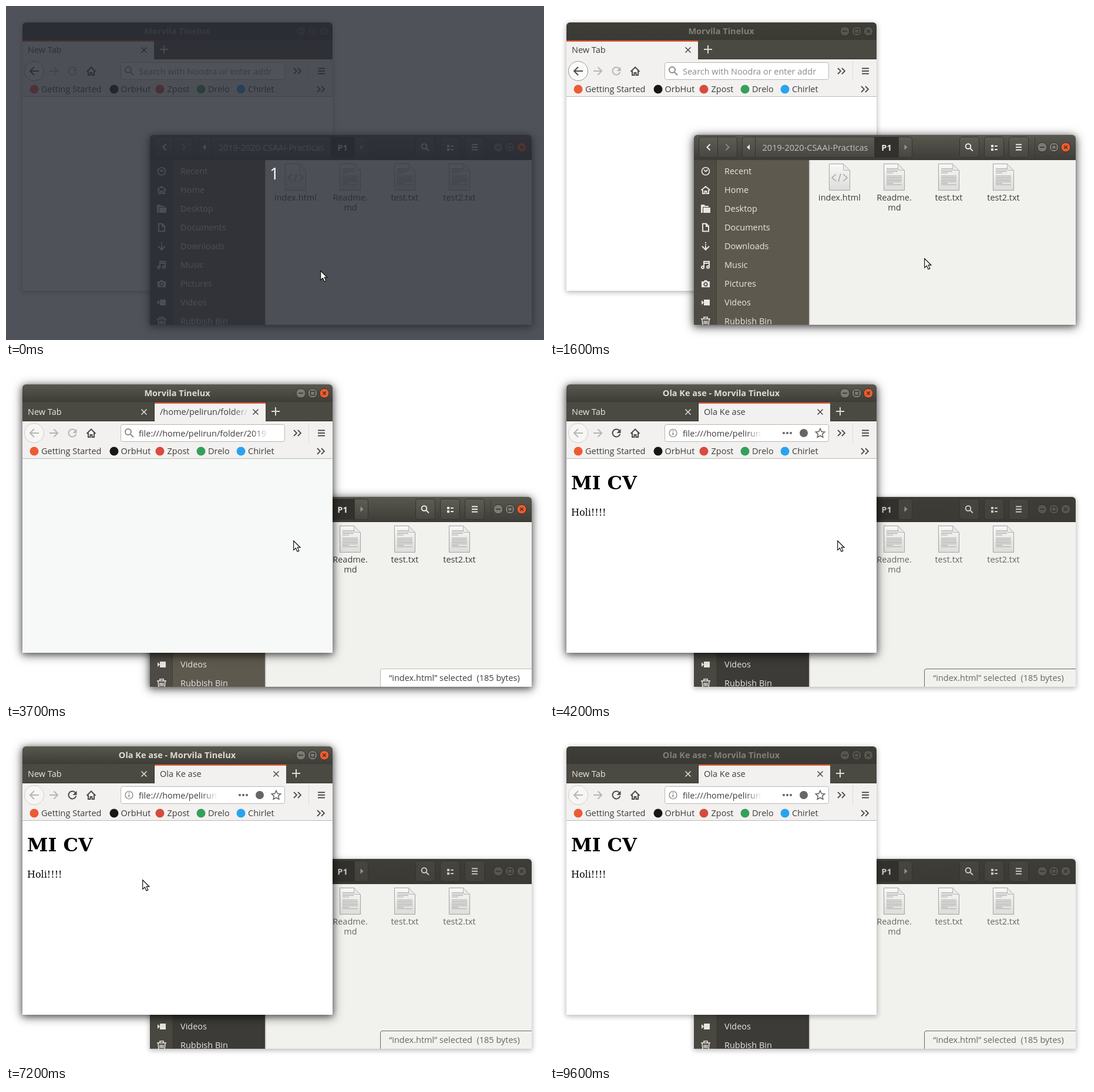
Recreate the animation shown at these times as an HTML page. Size 916 by 570 pixels, loop 9700 ms.

```html
<!DOCTYPE html>
<html lang="en">
<head>
<meta charset="utf-8">
<title>Opening a page from the file manager</title>
<style>
html, body { margin: 0; width: 100%; height: 100%; overflow: hidden; background: #fff; }
#stage { position: relative; width: 916px; height: 570px; overflow: hidden; background: #fff; }
.win {
  position: absolute; overflow: hidden; border-radius: 6px 6px 0 0;
  box-shadow: 0 3px 17px 1px rgba(0,0,0,calc(.58 * var(--focus))), 0 2px 9px 1px rgba(0,0,0,.27);
}
.win svg { position: absolute; inset: 0; width: 100%; height: 100%; }
#files {
  left: 245px; top: 220px; width: 650px; height: 324px;
  background: linear-gradient(var(--top), var(--bottom)) 0 0 / 100% 43px no-repeat, #f1f1ee;
}
#browser {
  left: 28px; top: 28px; width: 528px; height: 458px;
  background: linear-gradient(var(--top), var(--bottom)) 0 0 / 100% 30px no-repeat, #fff;
}
text { font: 14.5px "Open Sans", sans-serif; fill: #3d3d3d; white-space: pre; }
.bold { font-weight: 700; }
.mid { text-anchor: middle; }
.title { fill: var(--title); font-weight: 700; text-anchor: middle; }
.light { fill: #e9e6df; }
.soft { fill: #8b8b8a; }
.label { fill: var(--label); }
.serif { font-family: "DejaVu Serif", serif; font-size: 16px; fill: #000; }
.h1 { font-size: 32px; font-weight: 700; }
.ln { fill: none; stroke: #4c4c4a; stroke-width: 2; }
.off { stroke: #b7b6b3; }
.tool { stroke: var(--tool); }
.toolfill { fill: var(--tool); }
.frame { fill: rgba(255,255,255,.04); stroke: #34332e; }
.p0, .p1, .p2 { display: none; }
[data-phase="0"] .p0, [data-phase="1"] .p1, [data-phase="2"] .p2 { display: inline; }
.picked { display: none; }
[data-item="hover"] .sheet { fill: #fff; stroke: #f4f4f2; }
[data-item="picked"] .picked { display: inline; }
[data-item="picked"] .name { fill: #fff; }
#status { opacity: 0; }
#veil {
  position: absolute; inset: 0; z-index: 5; background: rgba(40,43,52,.81);
  font: 28px/1 "Open Sans", sans-serif; color: #fff;
}
#veil span { position: absolute; left: 449px; top: 271px; }
#pointer { position: absolute; z-index: 6; left: 0; top: 0; overflow: visible; }
</style>
</head>
<body>
<div id="stage">
  <div class="win" id="browser"></div>
  <div class="win" id="files"></div>
  <div id="veil"><span>1</span></div>
  <svg id="pointer" width="13" height="21">
    <path d="M.7 1V16.6L4.4 13.2 7 19.3 9.8 18.1 7.2 12.2H12Z" fill="#fff" stroke="#111" stroke-width="1.2"/>
  </svg>
</div>
<script>
const $ = id => document.getElementById(id);
const files = $('files'), browser = $('browser'), veil = $('veil'), pointer = $('pointer');

const text = (x, y, s, cls = '') => `<text x="${x}" y="${y}" class="${cls}">${s}</text>`;
const path = (d, style = '', cls = '') => `<path d="${d}" style="${style}" class="${cls}"/>`;
const line = (d, style = '', cls = '') => path(d, style, 'ln ' + cls);
const rect = (x, y, w, h, style, rx = 0, cls = '') =>
  `<rect x="${x}" y="${y}" width="${w}" height="${h}" rx="${rx}" style="${style}" class="${cls}"/>`;
const disc = (x, y, r, style, cls = '') => `<circle cx="${x}" cy="${y}" r="${r}" style="${style}" class="${cls}"/>`;
const group = (cls, ...parts) => `<g class="${cls}">${parts.join('')}</g>`;
const svg = (box, ...parts) => `<svg viewBox="${box}">${parts.join('')}</svg>`;
const cross = (x, y, r, style) => line(`M${x - r} ${y - r}l${2 * r} ${2 * r}m0 ${-2 * r}l${-2 * r} ${2 * r}`, style);
const plus = x => line(`M${x - 7} 74h14m-7 -7v14`, 'stroke:#dedbd3');
const chevrons = (x, y) => line(`M${x - 6} ${y - 5}l5 5l-5 5m7 -10l5 5l-5 5`, 'stroke-width:1.8');
const menu = (x, y, r, cls) => line(`M${x - r} ${y - 4.5}h${2 * r}m0 4.5h${-2 * r}m0 4.5h${2 * r}`, '', cls);
const glass = (x, y, r, cls, style) =>
  line(`M${x + r * .6} ${y + r * .6}l${r} ${r}`, style, cls) + disc(x - 1, y - 1, r, style, 'ln ' + cls);

function windowButtons(x, y) {
  const rim = 'stroke:#31302c';
  const glyph = 'stroke:#31302c;stroke-width:1.3';
  return disc(x, y, 8, 'fill:var(--button);' + rim) + line(`M${x - 4} ${y}h8`, glyph) +
    disc(x + 20, y, 8, 'fill:var(--button);' + rim) + line(`M${x + 16.5} ${y - 3.5}h7v7h-7z`, glyph) +
    disc(x + 40, y, 8, 'fill:var(--close);' + rim) + cross(x + 40, y, 2.8, glyph);
}

function reload(cls) {
  return line('M118.5 107.5A6.5 6.5 0 1 0 119.3 112.5', '', cls) +
    path('M120.5 104v7h-7z', `fill:${cls === 'off' ? '#b7b6b3' : '#4c4c4a'}`);
}

function buildBrowser() {
  const paper = '#f2f1ef';
  const tab = (x, w) => rect(x, 59, w, 32, `fill:${paper}`) + rect(x, 59, w, 2, 'fill:#f0623c');
  const bookmark = (x, color, tx, s) => disc(x, 142, 7.5, `fill:${color}`) + text(tx, 147, s);
  const fade = (x, y, h, id, end) =>
    rect(x - 28, y, 28, h, `fill:url(#${id})`) + rect(x, y, end - x, h, `fill:${id === 'fadeWhite' ? '#fff' : paper}`);
  const gradient = (id, c) => `<linearGradient id="${id}"><stop stop-color="${c}" stop-opacity="0"/><stop offset="1" stop-color="${c}"/></linearGradient>`;
  const lightX = 'stroke:#dedbd3;stroke-width:1.6', darkX = 'stroke-width:1.6';

  browser.innerHTML = svg('28 28 528 458',
    gradient('fadeWhite', '#fff'), gradient('fadePaper', paper),
    windowButtons(502, 43),
    group('p0 p1', text(291.5, 48, 'Morvila Tinelux', 'title')),
    group('p2', text(291.5, 48, 'Ola Ke ase - Morvila Tinelux', 'title')),
    rect(28, 58, 528, 33, 'fill:#4b4a42'), rect(28, 90, 528, 1, 'fill:#37362f'),
    group('p0', tab(28, 224), text(37, 80, 'New Tab'), cross(235, 75, 4.5, darkX), plus(269)),
    group('p1 p2', text(37, 80, 'New Tab', 'light'), cross(235, 75, 4.5, lightX), rect(252, 59, 1, 32, 'fill:#2f2e29')),
    group('p1', tab(253, 189), text(262, 80, '/home/pelirun/folder/'), fade(414, 64, 24, 'fadePaper', 442),
      cross(425, 75, 4.5, darkX), plus(459)),
    group('p2', tab(253, 224), text(262, 80, 'Ola Ke ase'), cross(460, 75, 4.5, darkX), plus(494)),

    rect(28, 91, 528, 64, `fill:${paper}`), rect(28, 154, 528, 1, 'fill:#bbbab7'),
    group('p0', disc(48, 111, 16.5, 'fill:#fbfbfa;stroke:#999895'), line('M56 111H41m7 -7l-7 7l7 7')),
    group('p1 p2', disc(48, 111, 16.5, 'fill:#f7f6f4;stroke:#cfceca'), line('M56 111H41m7 -7l-7 7l7 7', '', 'off')),
    line('M74 111H88m-6.500 -6.500l6.500 6.500l-6.500 6.500', '', 'off'),
    group('p0 p1', reload('off')), group('p2', reload('')),
    line('M137.500 112l7.500 -7.500l7.500 7.500M140 110.500v7.500h3.500v-4h3v4h3.500v-7.500'),
    rect(195.5, 96.5, 279, 29, 'fill:#fff;stroke:#b8b7b3', 3),
    group('p0 p1', glass(209, 110, 5, '', 'stroke:#8a8a8a')),
    group('p0', text(226, 117, 'Search with Noodra or enter addr', 'soft')),
    group('p1', text(226, 117, 'file:///home/pelirun/folder/2019'), fade(447, 99, 24, 'fadeWhite', 473)),
    group('p2', disc(209.5, 111, 6.5, 'stroke:#777;stroke-width:1.2', 'ln'),
      line('M209.5 110v4.500m0 -8v1.800', 'stroke:#777;stroke-width:1.6'),
      text(226, 117, 'file:///home/pelirun'), fade(361, 99, 24, 'fadeWhite', 390),
      ...[398, 404, 410].map(x => disc(x, 111, 2.1, 'fill:#666')),
      disc(432, 111, 7, 'fill:#666'),
      line('M460 103.500l2.300 5l5.400 .600l-4 3.700l1.100 5.400l-4.800 -2.700l-4.800 2.700l1.100 -5.400l-4 -3.700l5.400 -.600z', 'stroke:#666;stroke-width:1.6')),
    chevrons(496, 111), rect(515, 94, 1, 34, 'fill:#dddcd8'), menu(537, 111, 6),
    bookmark(48, '#ee5a35', 60, 'Getting Started'), bookmark(184, '#171717', 195.5, 'OrbHut'),
    bookmark(262, '#d64b3e', 274.5, 'Zpost'), bookmark(332, '#35a05a', 344, 'Drelo'),
    bookmark(400, '#2aa3ef', 412, 'Chirlet'), chevrons(536, 142),

    group('p1', rect(28, 155, 528, 331, 'fill:#f7f9f9')),
    group('p2', text(36, 207, 'MI CV', 'serif h1'), text(36, 252, 'Holi!!!!', 'serif')));
}

function sheet(x, body) {
  return path(`M${x - 17.5} 269.500h24l11 11v34h-35z`, '', 'sheet') +
    path(`M${x + 6.5} 269.500v9q0 2 2 2h9z`, 'fill:#e9e9e8;stroke:#a9a9a7;stroke-width:.8') + body;
}

function textSheet(x) {
  const rows = [...Array(12).keys()].map(i => {
    const y = 277.5 + i * 2.5 + (i > 3 ? 2.5 : 0);
    const w = i < 3 ? 19 : i === 3 || i === 9 ? 11 : i === 11 ? 19 : 26;
    return i < 11 ? `M${x - 13} ${y}h${w}` : '';
  });
  return sheet(x, line(rows.join(''), 'stroke:#a5a5a3;stroke-width:1'));
}

function buildFiles() {
  // Sidebar pictograms, each centred on 0,0
  const places = [
    ['Recent', line('M-6.500 0a6.500 6.500 0 1 0 13 0a6.500 6.500 0 1 0 -13 0M-3 -2.500L0 .500L3.500 -2.500', 'stroke-width:1.7')],
    ['Home', line('M-7.500 .500L0 -6L7.500 .500M-5 0V6H-1.500V2H1.500V6H5V0')],
    ['Desktop', path('M-8 -7H-2L-1 -5H5V-3H-5V7H-8ZM-4 -2H8V7H-4Z')],
    ['Documents', line('M-5 -6.500H1L5 -2.500V6.500H-5ZM1 -6V-2H5')],
    ['Downloads', line('M0 -7v2m0 1.500v2m0 1v6M-6 0L0 6L6 0')],
    ['Music', line('M-3 4V-6H6V3M-3 -3H6') + disc(-5, 4, 2, '', 'ln') + disc(4, 3.5, 2, '', 'ln')],
    ['Pictures', path('M-7 -4H-3L-2 -6H2L3 -4H7V6H-7Z') + disc(0, 1, 2.8, 'fill:#fff0;stroke:#4d4b43;stroke-width:1.8')],
    ['Videos', path('M-3 -5H7V5H-3ZM-7 -4L-3 0L-7 4Z')],
    ['Rubbish Bin', line('M-8 -4H8M-3 -4V-7H3V-4M-6 -4L-5 7H5L6 -4M-2.500 -1V5M0 -1V5M2.500 -1V5', 'stroke-width:1.6')]
  ];
  const sidebar = places.map(([name, icon], i) => {
    const y = 282 + i * 32;
    return `<g transform="translate(265 ${y})" class="place">${icon}</g>` + text(297, y + 5, name, 'light');
  }).join('');
  const button = x => rect(x + .5, 223.5, 33, 35, '', 4, 'frame');
  const squares = [[751, 237], [751, 243]].map(([x, y]) => rect(x, y, 4, 4, '', 0, 'toolfill') + rect(x + 6, y + 1, 5, 2, '', 0, 'toolfill')).join('');

  files.innerHTML = `<style>
      .sheet { fill: url(#page); stroke: #a3a3a1; }
      .place path { fill: #e9e6df; } .place .ln { fill: none; stroke: #e9e6df; }
    </style>` + svg('245 220 650 324',
    '<linearGradient id="page" x2="0" y2="1"><stop stop-color="#f9f9f9"/><stop offset="1" stop-color="#dcdcda"/></linearGradient>',
    rect(253.5, 223.5, 65, 35, '', 4, 'frame'), rect(285, 224, 1, 34, 'fill:#34332e'),
    line('M272.500 236l-5 5l5 5', '', 'tool'), line('M299.500 236l5 5l-5 5', 'stroke:#8b8880'),
    rect(327.5, 223.5, 289, 35, '', 4, 'frame'), rect(553, 224, 40, 34, 'fill:#32312d'),
    ...[349, 552, 593].map(x => rect(x, 224, 1, 34, 'fill:#34332e')),
    path('M340 236.500v9l-5 -4.500z', '', 'toolfill'), path('M603.500 236.500v9l5 -4.500z', 'fill:#96938a'),
    text(451.5, 247, '2019-2020-CSAAI-Practicas', 'mid place-path'), text(573, 247, 'P1', 'mid bold toolfill'),
    button(697), button(739), button(781),
    glass(713, 240.5, 4.3, 'tool', ''), squares, menu(798, 241, 5, 'tool'),
    rect(825, 224, 1, 34, 'fill:#3a3933'), windowButtons(838, 241),

    rect(245, 263, 39, 281, 'fill:var(--rail)'), rect(284, 263, 157, 281, 'fill:var(--side)'),
    rect(283, 263, 1, 281, 'fill:#413f38'), rect(441, 263, 2, 281, 'fill:#d4d1ca'), sidebar,

    group('first', sheet(493, line('M487 287l-7 6l7 6m12 -12l7 6l-7 6m-4 -13l-4 14', 'stroke:#a2a2a0;stroke-width:1.4')),
      group('picked', path('M475.5 269.500h24l11 11v34h-35z', 'fill:#f07746;opacity:.5'), rect(452, 318, 82, 19, 'fill:#f07746', 3)),
      text(493, 332, 'index.html', 'mid label name')),
    textSheet(586), text(586, 332, 'Readme.', 'mid label'), text(586.5, 349, 'md', 'mid label'),
    textSheet(679), text(679, 332, 'test.txt', 'mid label'),
    textSheet(772), text(772, 332, 'test2.txt', 'mid label'),
    `<g id="status">${path('M637.500 545v-28q0 -3.500 3.500 -3.500h256v32z', 'fill:var(--status);stroke:var(--edge)')}${
      text(763.5, 534, '“index.html” selected\u00a0 (185 bytes)', 'mid label')}</g>`);
  files.querySelector('.place-path').style.fill = '#c8c4bb';
}

// [focused, unfocused]
const palette = {
  top: ['#59584f', '#3e3d38'], bottom: ['#3d3c37', '#3a3934'],
  title: ['#dfdbd2', '#827f79'], button: ['#7c7a72', '#56554f'], close: ['#ef5c2e', '#56554f'],
  tool: ['#eeebe3', '#cbc7bf'], side: ['#5e594e', '#3c3b37'], rail: ['#4d4b43', '#494840'],
  label: ['#3d3d3d', '#686761'], status: ['#ffffff', '#f1f1ee'], edge: ['#bdbbb7', '#6a6964']
};
const channels = hex => [1, 3, 5].map(i => parseInt(hex.slice(i, i + 2), 16));

function setFocus(win, k) {
  if (win.focus === k) return;
  win.focus = k;
  win.style.setProperty('--focus', k);
  for (const [name, [on, off]] of Object.entries(palette)) {
    const a = channels(on), b = channels(off);
    win.style.setProperty('--' + name, `rgb(${a.map((v, i) => Math.round(b[i] + (v - b[i]) * k))})`);
  }
}

// Pointer moves: first step, last step, points passed
const STEP = 100, LOOP = 9700;
const moves = [
  [0, 0, [535, 451]],
  [900, 900, [536, 454]],
  [1100, 2000, [560, 473], [605, 484], [641, 455], [628, 415], [594, 394], [562, 389]],
  [2100, 2300, [546, 352], [526, 318]],
  [2500, 2600, [489, 294]],
  [4400, 4400, [475, 278]],
  [4600, 5500, [380, 235], [250, 180], [130, 150], [60, 162], [33, 212]],
  [5600, 5600, [31, 233]],
  [5700, 6400, [48, 272], [100, 284], [146, 262], [148, 205], [110, 158], [75, 154], [40, 195]],
  [6600, 7100, [21, 235], [50, 280], [120, 272], [140, 200], [175, 161], [217, 212]],
  [7200, 7200, [232, 255]],
  [7300, 7500, [240, 267], [247, 271]],
  [7800, 7900, [262, 230]],
  [8100, 8600, [225, 195], [165, 142], [190, 105], [225, 55], [250, -40]]
];

function along(points, u) {
  const s = u * (points.length - 1), i = Math.min(Math.floor(s), points.length - 2), f = s - i;
  const [a, b, c, d] = [-1, 0, 1, 2].map(o => points[Math.max(0, Math.min(points.length - 1, i + o))]);
  return [0, 1].map(n => b[n] + .5 * f * (c[n] - a[n] +
    f * (2 * a[n] - 5 * b[n] + 4 * c[n] - d[n] + f * (3 * (b[n] - c[n]) + d[n] - a[n]))));
}

function pointerAt(t) {
  const i = moves.findLastIndex(m => m[0] <= t);
  const [from, to, ...points] = moves[i];
  if (t >= to) return points.at(-1);
  return along([moves[i - 1].at(-1), ...points], (t - from + STEP) / (to - from + STEP));
}

function render(time) {
  const t = Math.floor((time % LOOP) / STEP) * STEP;
  const opened = t >= 3700;
  veil.style.display = t < 400 ? '' : 'none';
  browser.style.zIndex = opened ? 2 : 1;
  files.style.zIndex = opened ? 1 : 2;
  browser.dataset.phase = !opened ? 0 : t < 4000 ? 1 : 2;
  files.dataset.item = t < 2300 ? '' : t < 3200 ? 'hover' : 'picked';
  $('status').style.opacity = Math.max(0, Math.min(1, (t - 3300) / 200));
  setFocus(browser, opened && t < 9600 ? 1 : 0);
  setFocus(files, Math.max(0, Math.min(1, 1 - (t - 3700) / 300)));
  const [x, y] = pointerAt(t).map(Math.round);
  pointer.style.transform = `translate(${x}px, ${y}px)`;
}

buildBrowser();
buildFiles();
// Hover and selection affect only the first item
files.querySelectorAll('.sheet').forEach((el, i) => { if (i) el.style.cssText = 'fill:url(#page);stroke:#a3a3a1'; });

const start = performance.now();
(function tick() {
  render(performance.now() - start);
  requestAnimationFrame(tick);
})();
</script>
</body>
</html>
```
